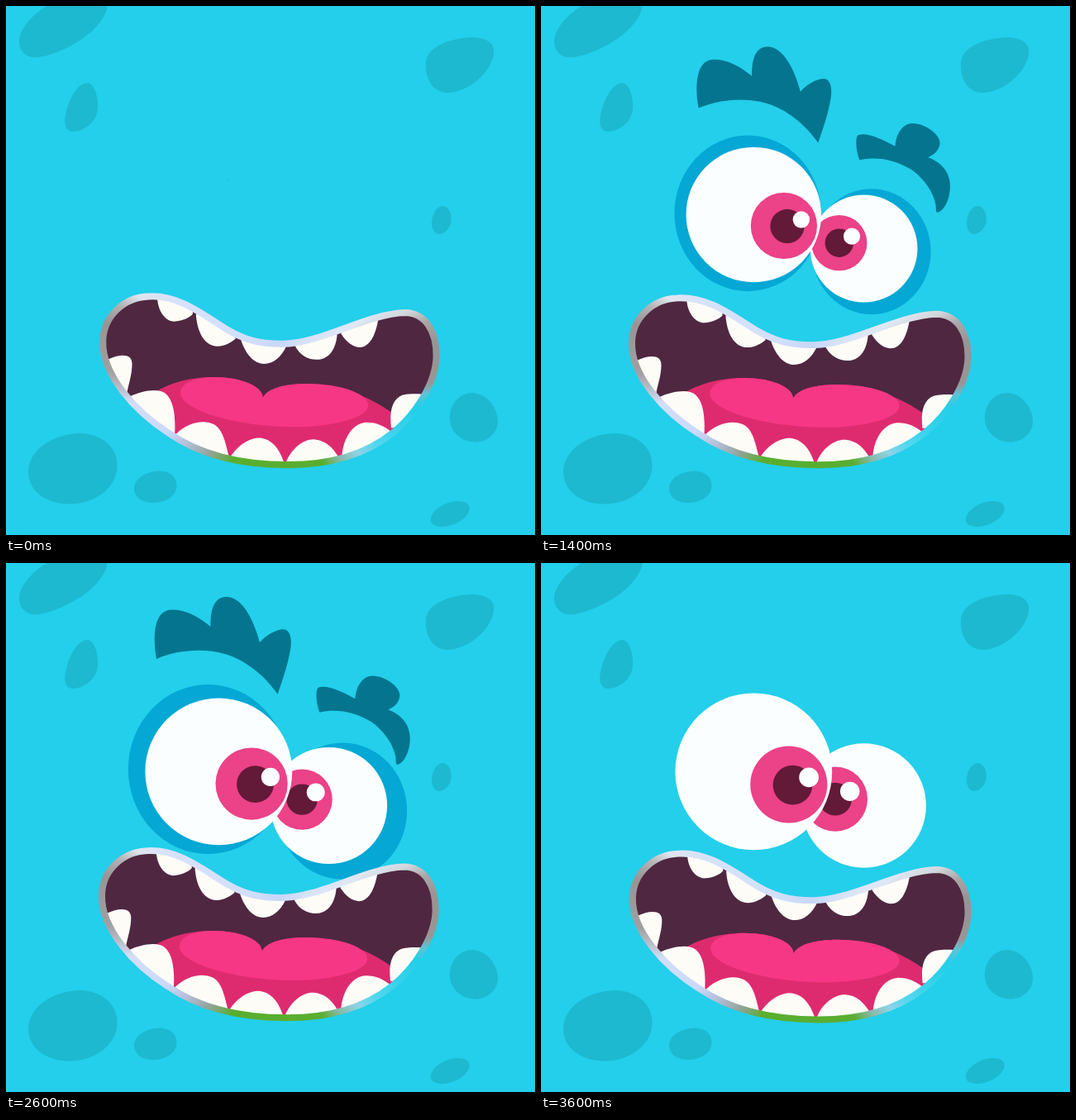
An HTML page with a canvas for the animation above (3.62 s loop, 640 px wide and 640 px high).

```html
<!DOCTYPE html>
<html lang="en">
<head>
<meta charset="utf-8">
<title>Monster face</title>
<style>
  html, body { margin: 0; width: 100%; height: 100%; overflow: hidden; background: #23cfea; }
  canvas { display: block; width: 100vw; height: 100vh; }
</style>
</head>
<body>
<canvas id="stage"></canvas>
<script>
const LOOP = 3620, STEP = 20, SIZE = 640;
const canvas = document.getElementById('stage');
const ctx = canvas.getContext('2d');
const ratio = window.devicePixelRatio || 1;
canvas.width = canvas.height = SIZE * ratio;

const SKIN = '#23cfea', SPOT = '#1db9d1', BROW = '#05758f', RING = '#05a7d5',
      WHITE = '#fbfefe', IRIS = '#eb4288', PUPIL = '#631938',
      MOUTH = '#4f2741', TONGUE_LOW = '#de2b6f', TONGUE_TOP = '#f63785', TOOTH = '#fdfcf7';

const spots = new Path2D(`
  M16 45C14 25 45-5 75-10H122C130 20 80 55 40 62C26 64 17 56 16 45Z
  M99 93C107 94 112 110 111 124C110 140 95 152 80 152C72 151 69 142 73 128C78 108 88 93 99 93Z
  M508 69C509 48 540 38 566 38C583 39 592 46 590 58C587 80 560 105 533 105C516 104 507 88 508 69Z
  M529 242C536 243 540 252 538.5 261C537 270 530 276 523 276C517 275 514 267 515.5 258C517 248 523 242 529 242Z`);
const lowSpots = new Path2D(`
  M537 497C538 480 549 468 565 468C582 469 596 487 595 504C594 518 581 528 567 527.5C550 527 536 514 537 497Z
  M27 563C28 537 56 518 88 517C117 517 136 535 134.5 558C133 585 105 603 76 602.5C48 602 27 587 27 563Z
  M155 583C156 571 170 563 186 562.5C199 563 207 570 206.5 581C206 593 193 601 178 601C164 601 155 594 155 583Z
  M514 620C516 609 532 599 547 599C557 599 562 603 560.5 610C557 622 540 630 527 630C517 629 513 626 514 620Z`);

const lips = new Path2D(`M165 351C195 349 220 364.5 250 384C281 405 303 408 328 408
  C375 408 430 372 478 370.5C503 371 516 393 516 422C516 455 490 494 463 515
  C430 541 385 553.5 335 553.5C278 553.5 230 543 190 515.5C148 489 108.5 445 109.5 405
  C110 375 135 352 165 351Z`);
const tongueLow = new Path2D(`M160 475C185 455 215 448 245 448C280 448 305 460 304.5 473
  C310 461 333 456 358 456C400 457 440 473 470 497V560H160Z`);
const tongueTop = new Path2D(`M204 467C204 454 225 448 245 448C280 448 305 460 304.5 473
  C310 461 333 456 358 456C400 456 433 468 433 482C433 498 385 508 345 508C270 508 204 487 204 467Z`);
const upperTeeth = new Path2D(`
  M176 356C178 372 188 382 198 381C208 380 216 376 219 372v-25H176Z
  M223 374C225 398 236 411 249 411C259 411 267 405 271 402v-30H223Z
  M278 404C285 424 296 432 306 432C317 432 327 424 333 411v-14H278Z
  M344 411C350 422 360 427 370 427C384 427 393 416 395 398v-10H344Z
  M400 396C408 408 417 413 425 412C436 410 442 396 445 380v-20H400Z`);
const lowerTeeth = new Path2D(`
  M115 427C130 420 145 419 145 432C145 445 141 455 139 466L100 450Z
  M143 471C158 464 178 461 186 468C197 477 198 500 197 516L150 525Z
  M199 516C212 503 232 498 245 505C256 511 259 528 263 543v14H199Z
  M266 542C277 527 290 521 300 521C316 522 325 535 330 550v10H266Z
  M333 550C340 533 355 522 368 523C381 524 390 533 396 543v14H333Z
  M401 543C402 525 412 504 430 502.5C442 502 453 507 460 513v30H401Z
  M461 509C458 484 465 469 482 468.5C489 468 497 468 503 469V509Z`);

// Rim colours by angle around the mouth, in degrees clockwise from the right.
const rim = ctx.createConicGradient(0, 313, 455);
[[0, '#999595'], [4, '#5fc3d4'], [9, SKIN], [20, '#38d2eb'], [30, '#55d7ee'], [38, '#8fd3e6'],
 [47, '#86b9a4'], [56, '#59ae30'], [116, '#59ae30'], [131, '#94a39a'], [144, '#b4bfd8'],
 [155, '#cbd9fa'], [172, '#d3def6'], [184, '#a29fa1'], [200, '#999494'], [207, '#b3b1b3'],
 [213, '#dfe5ee'], [222, '#d6e2fa'], [288, '#c7d7f8'], [326, '#dfe8f5'], [333, '#d3d7dc'],
 [339, '#a9a6a7'], [346, '#999494'], [360, '#999595']
].forEach(([deg, color]) => rim.addColorStop(deg / 360, color));

let seed = 7;
function rand() {
  seed = (seed * 16807) % 2147483647;
  return seed / 2147483647 * 2 - 1;
}

// Put random shakes between the fixed poses.
function shake(poses, rest, amp) {
  const keys = [];
  poses.forEach((pose, i) => {
    keys.push(pose);
    const next = poses[i + 1];
    if (!next) return;
    const n = Math.round((next[0] - pose[0]) / 160);
    for (let j = 1; j < n; j++) {
      const t = pose[0] + (next[0] - pose[0]) * j / n;
      keys.push([t, ...rest.map((v, k) => v + amp[k] * rand())]);
    }
  });
  return keys;
}

function poseAt(keys, t) {
  let i = 0;
  while (i < keys.length - 2 && keys[i + 1][0] <= t) i++;
  const a = keys[i], b = keys[i + 1];
  const p = Math.min(1, (t - a[0]) / (b[0] - a[0]));
  const e = (1 - Math.cos(Math.PI * p)) / 2;
  return a.slice(1).map((v, k) => v + (b[k + 1] - v) * e);
}

// Time, x, y, width, height.
const mouthKeys = shake([
  [0, 6.2, 1, .992, 1.006], [460, -.5, -2.5, .978, 1], [880, -2.2, -1, .994, 1],
  [1400, .5, 2, 1, .997], [2280, 2.5, 4, 1.005, 1.003], [2920, 0, .5, 1, 1], [3600, 1, -.2, .998, .992]
], [1, .5, .995, 1], [5, 4, .008, .006]);

// Time, x, y, turn, scale.
const browAmp = [8, 7, 1.2, .01];
const brows = [
  { delay: 0, pivot: [261.5, 136.5], center: [269, 100],
    path: new Path2D(`M190 114C186 90 187 56 209 56C225 56 240 64 255 77C255 55 261 42 274 42
      C294 42 307 72 313 97C321 88 333 82 341 82C351 82 352 98 348 112C344 130 338 145 333 159
      C318 136 296 118 272 110C245 102 215 104 190 114Z`),
    keys: shake([
      [0, 3, 4, 0, 1], [460, 3, 4.5, .8, 1.02], [880, -8.5, 6.8, -1.1, 1.03], [1400, 1.5, 8, -1.2, 1.005],
      [2280, 1, 2, 1.4, 1.01], [2920, 0, 0, 0, 1], [3600, 0, 3, 0, 1]
    ], [0, 1, 0, 1.01], browAmp) },
  { delay: 20, pivot: [424, 213.2], center: [429, 190],
    path: new Path2D(`M377 182C373 172 371 155 375 152C385 148 403 156 420 165C421 148 430 137 441 137
      C456 137 474 150 474 160C474 169 467 175 460 178
      C475 183 487 195 487 213C487 227 481 242 472 244.5C470 244.5 470 240 470 236
      C466 215 450 200 440 193C420 181 398 177 377 182Z`),
    keys: shake([
      [0, 4, 0, 0, 1], [460, 10.5, 1.8, 1.2, 1.02], [880, -8, -.3, -1.2, 1.02], [1400, 8, 4.8, .6, 1],
      [2280, -2, -14.2, -.2, 1], [2920, 0, 0, 0, 1], [3600, 3, 0, 0, 1]
    ], [1, -1, 0, 1], browAmp) }
];

// Offsets and radii are at scale 1; the left eye lies on top.
const eyes = [
  { x: 390.6, y: 293.5, r: 59.2, iris: [-27.2, -6.2, 30.7], pupil: [-27.2, -6.2, 15.7], shine: [-13.3, -13.5, 9.2] },
  { x: 257.3, y: 252.4, r: 74.6, iris: [33.4, 12.3, 36.6], pupil: [37.1, 12.8, 18.8], shine: [52.5, 5.5, 9.3] }
];
const rings = [[-60.5, -12.7, 81, 86], [76, 29.6, 65.5, 69.3]];

function fill(path, color) {
  ctx.fillStyle = color;
  ctx.fill(path);
}

function oval(x, y, rx, ry, color) {
  ctx.beginPath();
  ctx.ellipse(x, y, rx, ry, 0, 0, Math.PI * 2);
  ctx.fillStyle = color;
  ctx.fill();
}

function around([x, y], dx, dy, deg, sx, sy = sx) {
  ctx.translate(x + dx, y + dy);
  ctx.rotate(deg * Math.PI / 180);
  ctx.scale(sx, sy);
  ctx.translate(-x, -y);
}

function group(draw) {
  ctx.save();
  draw();
  ctx.restore();
}

function drawEyes(t) {
  const k = (.984 + t * .00008) * (1 - Math.exp(-t / 115));
  if (k <= 0) return;
  if (t < 3600) {
    for (const [x, y, rx, ry] of rings)
      oval(316.5 + x * k, 264.7 + y * k, rx * k, ry * k, RING);
  }
  for (const eye of eyes) {
    const disc = ([x, y, r], color) => oval(eye.x + x * k, eye.y + y * k, r * k, r * k, color);
    disc([0, 0, eye.r], WHITE);
    disc(eye.iris, IRIS);
    disc(eye.pupil, PUPIL);
    disc(eye.shine, WHITE);
  }
}

function drawMouth(t) {
  const [dx, dy, sx, sy] = poseAt(mouthKeys, t);
  group(() => {
    around([312.5, 452.5], dx, dy, 0, sx, sy);
    group(() => {
      ctx.clip(lips);
      fill(lips, MOUTH);
      fill(tongueLow, TONGUE_LOW);
      fill(tongueTop, TONGUE_TOP);
      fill(upperTeeth, TOOTH);
      fill(lowerTeeth, TOOTH);
    });
    ctx.strokeStyle = rim;
    ctx.lineWidth = 8;
    ctx.stroke(lips);
  });
}

function drawBrow(brow, t) {
  const age = t - brow.delay;
  if (age < 0 || t >= 3600) return;
  const spring = 1 - Math.exp(-age / 90) * Math.cos(age * Math.PI / 130);
  const [dx, dy, deg, s] = poseAt(brow.keys, t);
  group(() => {
    around(brow.center, 0, 110 * (1 - spring), 0, Math.max(spring, .008));
    around(brow.pivot, dx, dy, deg, s);
    fill(brow.path, BROW);
  });
}

function draw(t) {
  ctx.setTransform(ratio, 0, 0, ratio, 0, 0);
  ctx.fillStyle = SKIN;
  ctx.fillRect(0, 0, SIZE, SIZE);
  fill(spots, SPOT);
  fill(lowSpots, SPOT);
  drawEyes(t);
  drawMouth(t);
  brows.forEach(brow => drawBrow(brow, t));
}

const start = performance.now();
function tick() {
  const t = Math.max(0, performance.now() - start) % LOOP;
  draw(Math.floor(t / STEP) * STEP);
  requestAnimationFrame(tick);
}
tick();
</script>
</body>
</html>
```
